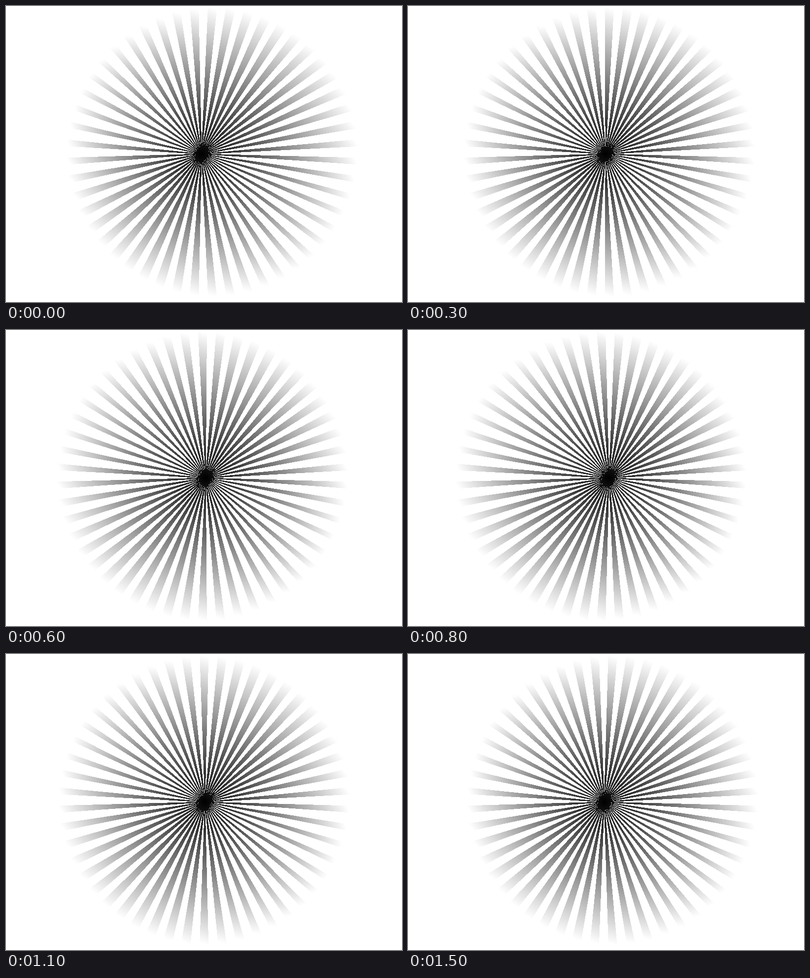
An HTML page that plays this animation: 800x600 px, repeating every 1.6 s.

```html
<!DOCTYPE html>
<html lang="en">
<head>
<meta charset="utf-8">
<title>Swaying starburst</title>
<style>
  html, body { margin: 0; width: 100%; height: 100%; overflow: hidden; background: #fff; }
  svg { display: block; }
  polygon { stroke-width: 1; stroke-linejoin: bevel; shape-rendering: crispEdges; }
</style>
</head>
<body>
<svg id="stage" width="800" height="600" viewBox="0 0 800 600"></svg>
<script>
  const stage = document.getElementById('stage');
  const RAYS = 50, RADIUS = 292, RIM_Y = 296, APEX_Y = 300;
  const STEP = 100, HALF = 8;
  // Tilted oval nib that every ray runs out to: squared extents and their skew
  const NIB = { xx: 72, xy: 23, yy: 42 };

  function add(parent, tag, attrs) {
    const el = document.createElementNS('http://www.w3.org/2000/svg', tag);
    setAll(el, attrs);
    return parent.appendChild(el);
  }

  function setAll(el, attrs) {
    for (const name in attrs) el.setAttribute(name, attrs[name]);
  }

  const rays = Array.from({ length: RAYS }, (_, i) => {
    const angle = Math.PI / 2 + i * 2 * Math.PI / RAYS;
    const fade = add(stage, 'linearGradient', { id: 'fade' + i, gradientUnits: 'userSpaceOnUse' });
    add(fade, 'stop', { offset: 0, 'stop-color': '#000' });
    add(fade, 'stop', { offset: 1, 'stop-color': '#fff' });
    const paint = `url(#fade${i})`;
    const wedge = add(stage, 'polygon', { fill: paint, stroke: paint });
    return { dx: RADIUS * Math.cos(angle), dy: RADIUS * Math.sin(angle), fade, wedge };
  });

  // Half of the nib's edge as seen along the direction (x, y)
  function nibEdge(x, y) {
    const ex = -NIB.xx * y + NIB.xy * x;
    const ey = -NIB.xy * y + NIB.yy * x;
    const size = Math.sqrt(-y * ex + x * ey);
    return [ex / size, ey / size];
  }

  function draw(pos) {
    const apexX = 395 + 1.38 * pos;
    const rimX = 417 - 3.35 * pos;
    for (const { dx, dy, fade, wedge } of rays) {
      const tipX = rimX + dx, tipY = RIM_Y + dy;
      const x = tipX - apexX, y = tipY - APEX_Y;
      const [ex, ey] = nibEdge(x, y);
      wedge.setAttribute('points',
        `${apexX},${APEX_Y} ${tipX + ex},${tipY + ey} ${tipX - ex},${tipY - ey}`);
      // The shade runs at right angles to the slanted tip
      const k = (y * ex - x * ey) / (ex * ex + ey * ey);
      setAll(fade, { x1: apexX, y1: APEX_Y, x2: apexX - k * ey, y2: APEX_Y + k * ex });
    }
  }

  // The rim and the apex sway in opposite directions, in hard steps
  const start = performance.now();
  let shown = -1;
  function tick() {
    const step = Math.floor((performance.now() - start) / STEP) % (2 * HALF);
    if (step !== shown) draw(HALF - Math.abs(HALF - step));
    shown = step;
    requestAnimationFrame(tick);
  }
  tick();
</script>
</body>
</html>
```
